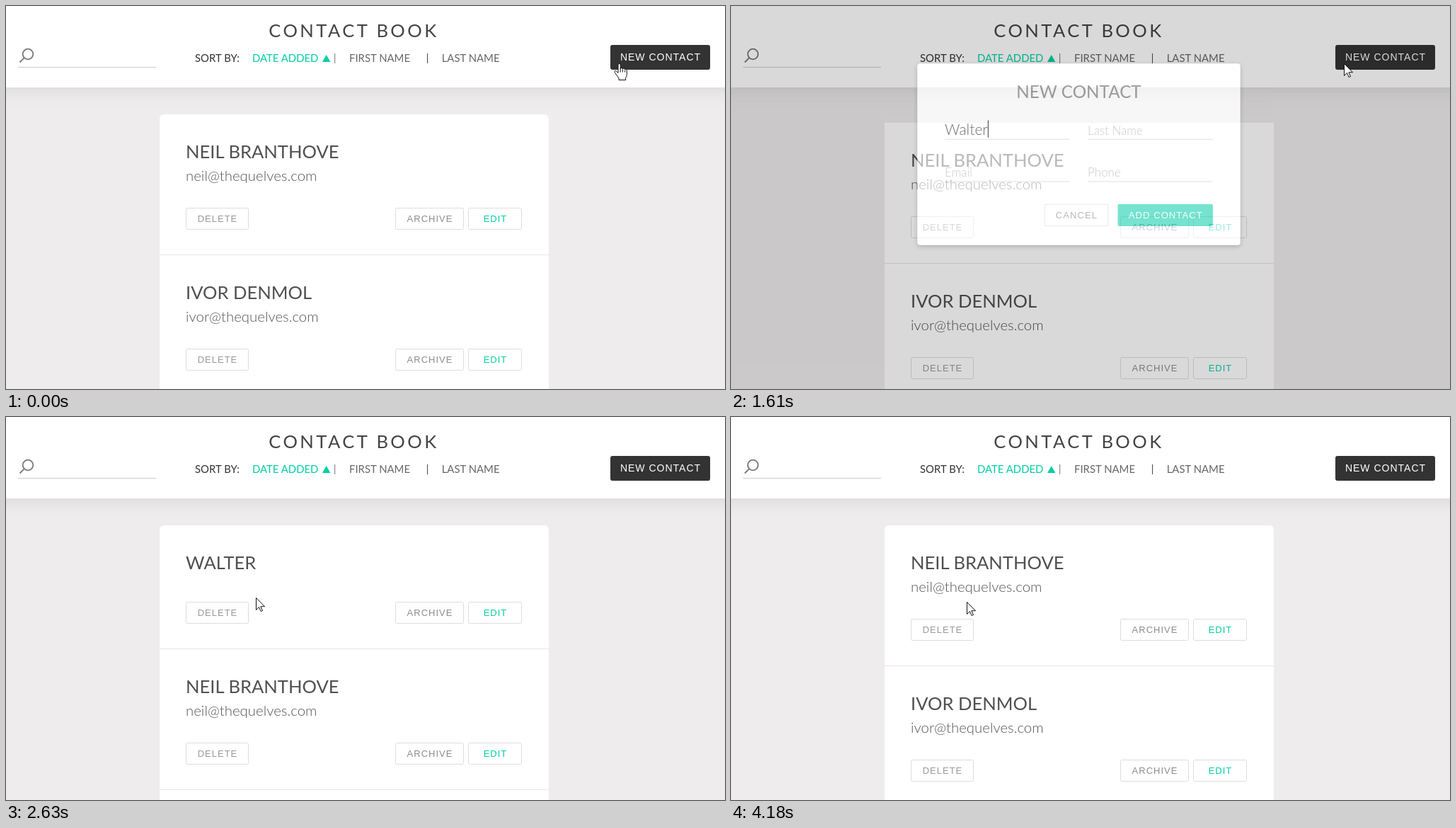
Write an HTML page that moves like this. It is 1016 px wide and 541 px high and loops after 4.41 s.

```html
<!DOCTYPE html>
<html lang="en">
<head>
<meta charset="utf-8">
<title>Contact book</title>
<style>
  html, body { margin: 0; width: 100%; height: 100%; overflow: hidden; background: #eeeced; }
  svg { display: block; width: 100vw; height: 100vh; }
  text { font-family: Lato, sans-serif; white-space: pre; }
  .light { font-weight: 300; font-size: 20.4px; fill: #555; }
  .hint { font-weight: 300; font-size: 16.8px; fill: #aaa; }
  .name { font-size: 25.6px; fill: #505050; }
  .sort { font-size: 14.9px; fill: #666; }
  .btn text { font: 13px "Liberation Sans", Arial, sans-serif; letter-spacing: 1px; text-anchor: middle; }
  #head { filter: drop-shadow(0 3px 12px rgba(0, 0, 0, .09)); }
  #panel { filter: drop-shadow(0 2px 3px rgba(0, 0, 0, .38)); }
</style>
</head>
<body>
<svg id="stage" viewBox="0 0 1016 541"></svg>
<script>
const LOOP = 4410, STEP = 76, TOP = 153, TALL = 199, SHORT = 175;
const TEAL = '#00cea6', RED = '#c4242c', NEWCOMER = 'Walter';
const $ = id => document.getElementById(id);

const text = (x, y, s, cls, extra = '') => `<text x="${x}" y="${y}" class="${cls}" ${extra}>${s}</text>`;
const line = (x1, x2, y, color) => `<path d="M${x1} ${y}H${x2}" stroke="${color}"/>`;

function button(x, y, w, label, color, fill = '#fff', stroke = '#ddd', h = 31, extra = '') {
  return `<g class="btn" ${extra}><rect x="${x + .5}" y="${y + .5}" width="${w - 1}" height="${h - 1}" rx="2" fill="${fill}" stroke="${stroke}"/>` +
    `<text x="${x + w / 2 + .5}" y="${y + h / 2 + 4.5}" fill="${color}">${label}</text></g>`;
}

const card = (w, h, r) =>
  `M217 ${h}V${r}q0-${r} ${r}-${r}h${w - 2 * r}q${r} 0 ${r} ${r}V${h}z`;

// One contact, drawn from its own top edge
function row(id, name, mail) {
  const h = mail ? TALL : SHORT, y = h - 67;
  return `<path id="${id}Card" d="${card(550, h, 0)}" fill="#fff"/>` +
    `<path id="${id}Rule" d="M217 ${h - .5}H767" stroke="#e6e6e6"/>` +
    text(254, 62, name, 'name') + (mail ? text(254, 94, mail, 'light') : '') +
    button(254, y, 89, 'DELETE', '#999', '#fff', '#ddd', 31, `id="${id}Delete"`) +
    `<g id="${id}Tools">${button(550, y, 97, 'ARCHIVE', '#8c8c8c')}${button(653, y, 76, 'EDIT', TEAL)}</g>`;
}

$('stage').innerHTML = `
  <rect width="1016" height="541" fill="#eeeced"/>
  <rect id="head" x="-60" y="-60" width="1136" height="175" fill="#fff"/>
  ${text(491.4, 44, 'CONTACT BOOK', 'name', 'text-anchor="middle" style="letter-spacing:3.4px;fill:#444"')}
  <g fill="none" stroke="#777" stroke-width="1.8"><circle cx="31" cy="68" r="7.3"/><path d="M25.8 73.2L19.5 79.5"/></g>
  ${line(17, 212, 86.5, '#ccc')}
  ${text(267, 79, 'SORT BY:', 'sort', 'style="fill:#333"')}
  ${text(348, 79, 'DATE ADDED', 'sort', `style="fill:${TEAL}"`)}
  <path d="M447 79L452.7 69L458.4 79z" fill="${TEAL}"/>
  <path d="M464.7 67V81" stroke="#777"/><path d="M595.5 67V81" stroke="#444"/>
  ${text(485, 79, 'FIRST NAME', 'sort')}${text(615.7, 79, 'LAST NAME', 'sort')}
  ${button(854, 55, 141, '<tspan font-size="14">NEW CONTACT</tspan>', '#fff', '#333', '#333', 35)}
  <g id="fresh">${row('fresh', NEWCOMER.toUpperCase(), '')}</g>
  <g id="list">
    ${row('first', 'NEIL BRANTHOVE', 'neil@thequelves.com')}
    <g transform="translate(0 ${TALL})">${row('second', 'IVOR DENMOL', 'ivor@thequelves.com')}</g>
  </g>
  <g id="mask">
    <rect width="1016" height="541" fill="#000" fill-opacity=".25"/>
    <g id="modal">
      <rect id="panel" x="265.5" y="82.5" width="452" height="254" rx="4" fill="#fff"/>
      ${text(491.5, 131, 'NEW CONTACT', 'name', 'text-anchor="middle" style="font-size:24px;fill:#666"')}
      ${[[304, 188.5], [504, 188.5], [304, 247.5], [504, 247.5]].map(([x, y]) => line(x, x + 175, y, '#ccc')).join('')}
      ${text(304, 182, 'First Name', 'hint', 'id="hint"')}${text(504, 182, 'Last Name', 'hint')}
      ${text(304, 241, 'Email', 'hint')}${text(504, 241, 'Phone', 'hint')}
      ${text(304, 182, '', 'light', 'id="typed" style="font-size:20.8px;fill:#111"')}
      <rect id="caret" y="162" width="1.3" height="24"/>
      ${button(443, 279, 90, 'CANCEL', '#8c8c8c')}
      ${button(546, 279, 133, 'ADD CONTACT', '#fff', '#1ad1b0', '#1ad1b0')}
    </g>
  </g>
  <g id="cursor" fill="#fff" stroke="#111" stroke-linejoin="round">
    <path id="arrow" d="M0 0V17l4-4 2.6 6 2.4-1-2.6-5.8H12z"/>
    <g id="hand"><path d="M-1.5 13V1.5a1.6 1.6 0 0 1 3.2 0V7.5q0-1.5 1.6-1.5t1.6 1.8q.2-1.3 1.6-1.3t1.6 2q.3-1 1.2-1t1.5 1.8V15q0 3-1.7 5v3H-.5v-2.5L-6 12.8q-1.5-2.8 1.2-2.8z"/>
    <path d="M1.7 7v5M4.9 8v4M8.1 9v3" fill="none"/></g>
  </g>`;

const clamp = v => Math.min(1, Math.max(0, v));
const span = (t, start, length) => clamp((t - start) / length);
const smooth = x => x * x * (3 - 2 * x);

// The CSS "ease" curve, cubic-bezier(.25, .1, .25, 1)
function ease(x) {
  const bez = (s, a, b) => 3 * (1 - s) * s * ((1 - s) * a + s * b) + s * s * s;
  let lo = 0, hi = 1;
  for (let i = 0; i < 24; i++) {
    const mid = (lo + hi) / 2;
    if (bez(mid, .25, .25) < x) lo = mid; else hi = mid;
  }
  return bez(lo, .1, 1);
}

// Motion advances in even steps, counted from the start of each phase
function tick(t) {
  const start = [3190, 1540, 230].find(s => s <= t);
  return start === undefined ? t : start + Math.floor((t - start + 8) / STEP) * STEP;
}

const show = (id, on) => $(id).setAttribute('visibility', on ? 'visible' : 'hidden');
const zoom = (id, k, x, y, top = 0) =>
  $(id).setAttribute('transform', `translate(${x} ${y + top}) scale(${k}) translate(${-x} ${-y})`);

function drawModal(t, now) {
  const opened = ease(span(t, 215, 300)) * (1 - ease(span(t, 1542, 300)));
  $('mask').setAttribute('opacity', opened);
  zoom('modal', 1 + .025 * (1 - opened), 491.5, 209.5);
  const count = now < 680 ? 0 : now < 910 ? 1 : now < 1160 ? 3 : now < 1260 ? 5 : 6;
  $('typed').textContent = NEWCOMER.slice(0, count);
  $('caret').setAttribute('x', 304 + (count ? $('typed').getComputedTextLength() : 0));
  $('hint').setAttribute('opacity', count ? 0 : 1);
}

function drawList(t) {
  const enter = ease(span(t, 1546, 860)), close = ease(span(t, 3190, 990));
  const leaving = t >= 3190, fade = ease(span(t, 3170, 300));
  const width = leaving ? 343 : 550;
  $('list').setAttribute('transform', `translate(0 ${TOP + Math.round(SHORT * enter * (1 - close))})`);
  $('firstCard').setAttribute('d', card(550, TALL, enter > 0 && !leaving ? 0 : 7));

  $('fresh').setAttribute('opacity', enter * (leaving ? 1 - fade : 1));
  zoom('fresh', leaving ? 1 + .03 * fade : 1, 217 + width / 2, SHORT / 2, TOP);
  $('freshCard').setAttribute('d', card(width, SHORT, 7));
  $('freshRule').setAttribute('d', `M217 ${SHORT - .5}h${width}`);
  $('freshTools').setAttribute('transform', `translate(${width - 550} 0)`);
  const [box, label] = $('freshDelete').children, hover = t >= 2690;
  box.setAttribute('stroke', hover ? RED : '#ddd');
  label.setAttribute('fill', hover ? RED : '#999');
}

function drawCursor(t) {
  const go = smooth(span(t, 2105, 560));
  const x = 866 - 531 * go, y = 81 + 180 * go;
  const onNew = t < 300 || t >= 1840 && y < 90 && x > 854;
  const onDelete = t >= 2690 && t < 3640;
  const hand = onNew || onDelete;
  show('hand', hand);
  show('arrow', !hand);
  $('cursor').setAttribute('transform', `translate(${Math.round(x) - (t >= 3640 ? 2 : 0) + .5} ${Math.round(y) + .5})`);
}

function draw() {
  const now = performance.now() % LOOP, t = tick(now);
  drawModal(t, now);
  drawList(t);
  drawCursor(t);
  requestAnimationFrame(draw);
}
draw();
</script>
</body>
</html>
```
